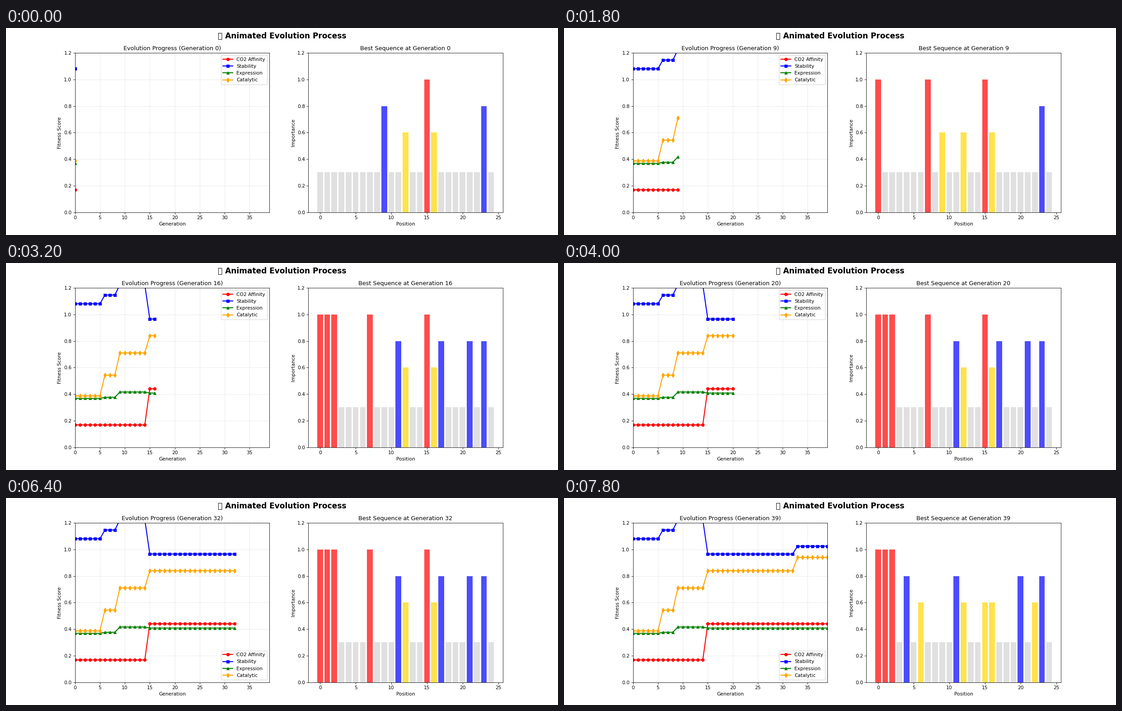
A matplotlib script for the animation above (8 s loop, 1222 by 458 pixels).

```python
import matplotlib.pyplot as plt
import numpy as np
from matplotlib.animation import FuncAnimation

plt.rcParams["font.family"] = "DejaVu Sans"

DPI = 76.375
FIGSIZE = (16, 5.997)  # 1222 x 458 pixels

GENERATIONS = 40
STAGE_LENGTHS = [6, 3, 6, 18, 7]  # generations each best sequence survives
STAGE = np.repeat(np.arange(5), STAGE_LENGTHS)
LEGEND_MOVES_AT = 30

# label, colour, marker, score in each stage
METRICS = [
    ("CO2 Affinity", "red", "o", [0.168, 0.168, 0.168, 0.44, 0.44]),
    ("Stability", "blue", "s", [1.08, 1.146, 1.223, 0.965, 1.024]),
    ("Expression", "green", "^", [0.368, 0.376, 0.416, 0.408, 0.408]),
    ("Catalytic", "orange", "d", [0.387, 0.543, 0.71, 0.84, 0.94]),
]

# Residue classes: R = key, B = strong, Y = medium, . = other
SEQUENCES = [
    ".........B..Y..RY......B.",
    "R........Y..Y..RY......B.",
    "R......R.Y..Y..RY......B.",
    "RRR....R...BY..RYB...B.B.",
    "RRR.B.Y....BY..YY...B.YB.",
]
STYLES = {
    "R": ("red", 1.0),
    "B": ("blue", 0.8),
    "Y": ("gold", 0.6),
    ".": ("lightgray", 0.3),
}

fig, (ax_scores, ax_seq) = plt.subplots(1, 2, figsize=FIGSIZE, dpi=DPI)
fig.suptitle("\U0001F9EC Animated Evolution Process", fontsize=16, fontweight="bold")

lines = [
    ax_scores.plot([], [], color=color, marker=marker, linewidth=2,
                   markersize=6, label=label)[0]
    for label, color, marker, _ in METRICS
]
histories = [np.array(scores)[STAGE] for *_, scores in METRICS]
ax_scores.set(xlim=(0, GENERATIONS - 1), ylim=(0, 1.2),
              xlabel="Generation", ylabel="Fitness Score")
ax_scores.grid(True, alpha=0.3)

length = len(SEQUENCES[0])
bars = ax_seq.bar(range(length), np.ones(length), alpha=0.7)
ax_seq.set(xlim=(-1.64, length + 0.64), ylim=(0, 1.2),
           xlabel="Position", ylabel="Importance")


def update(gen):
    for line, history in zip(lines, histories):
        line.set_data(np.arange(gen + 1), history[:gen + 1])
    corner = "upper right" if gen < LEGEND_MOVES_AT else "lower right"
    ax_scores.legend(loc=corner)
    ax_scores.set_title(f"Evolution Progress (Generation {gen})")

    for bar, residue in zip(bars, SEQUENCES[STAGE[gen]]):
        color, height = STYLES[residue]
        bar.set_facecolor(color)
        bar.set_height(height)
    ax_seq.set_title(f"Best Sequence at Generation {gen}")
    return [*lines, *bars]


anim = FuncAnimation(fig, update, frames=GENERATIONS, interval=200,
                     init_func=lambda: update(0), repeat=True, repeat_delay=0)
plt.show()
```
